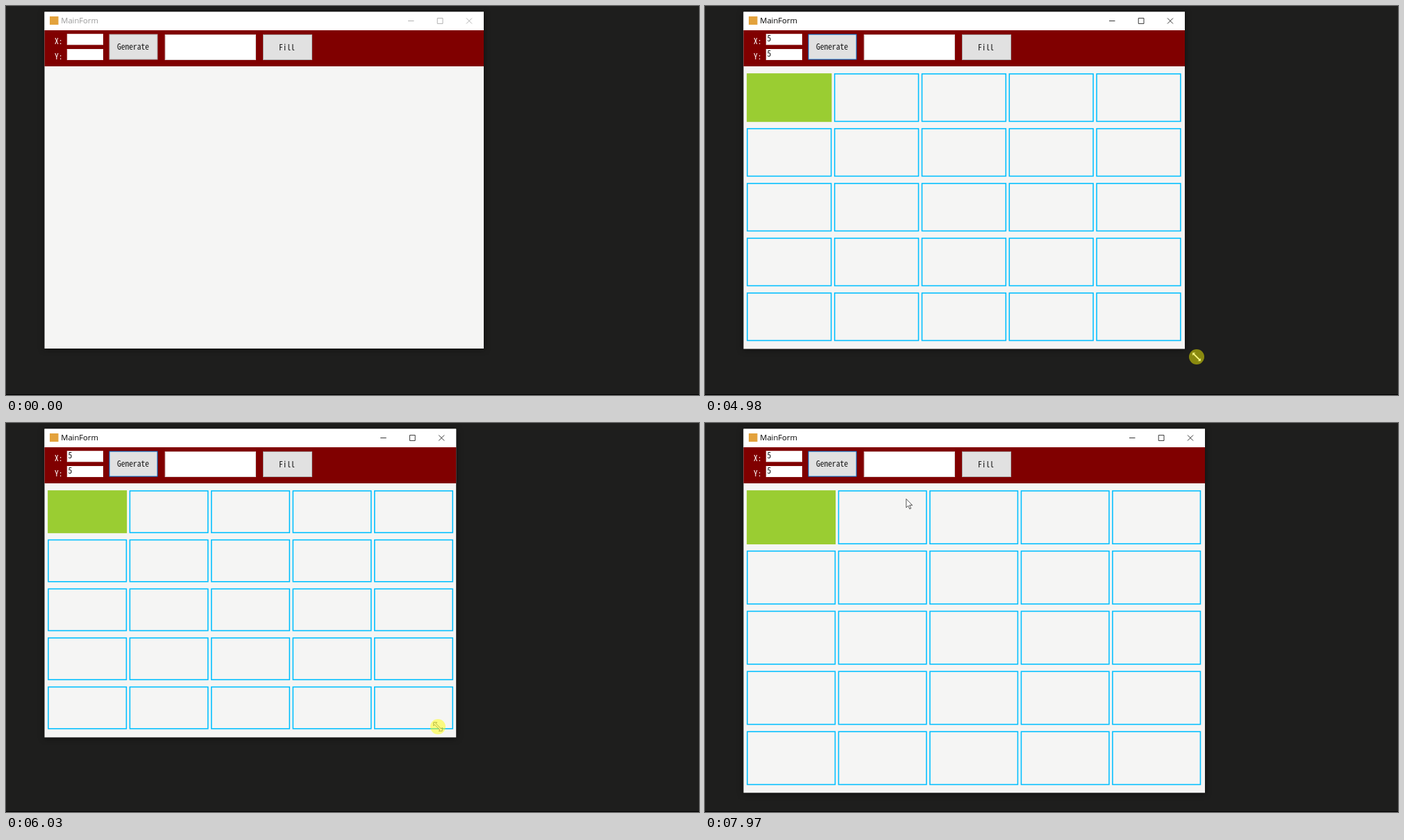
An HTML page that plays this animation: 998 by 561 pixels, repeating every 8000 ms.

```html
<!DOCTYPE html>
<html lang="en">
<head>
<meta charset="utf-8">
<title>Grid form</title>
<style>
  html, body { margin: 0; width: 100%; height: 100%; overflow: hidden; background: #1e1e1d; }
  svg { display: block; width: 998px; height: 561px; }
  text { white-space: pre; }
  .title { font: 11.2px "Open Sans", "Noto Sans", sans-serif; }
  .mono { font-family: "Noto Sans Mono CJK SC", "Liberation Mono", monospace; }
  .glyph { fill: none; stroke-width: .9; }
  .frame { filter: drop-shadow(0 1.5px 4px rgba(0, 0, 0, .55)); }
</style>
</head>
<body>
<svg id="stage" viewBox="0 0 998 561"></svg>
<script>
const LOOP = 8000, STEP = 77.4, UNIT = 998 / 1920;
const LEFT = 55.5, TOP = 8.5, N = 5;
const BLUE = '#0078d7';
const stage = document.getElementById('stage');

function set(node, attrs) {
  for (const a in attrs) node.setAttribute(a, attrs[a]);
  return node;
}
function add(tag, attrs, parent = stage) {
  return parent.appendChild(set(document.createElementNS('http://www.w3.org/2000/svg', tag), attrs));
}
function box(x, y, width, height, fill, stroke = 'none') {
  return add('rect', { x, y, width, height, fill, stroke });
}
function label(x, y, str, fill, cls = 'mono', anchor = 'start') {
  const node = add('text', { x, y, fill, class: cls, 'text-anchor': anchor });
  node.textContent = str;
  return node;
}
const show = (node, on) => set(node, { visibility: on ? 'visible' : 'hidden' });

// Pick the size at which one monospaced character is 5.75px wide
const pen = document.createElement('canvas').getContext('2d');
pen.font = '100px "Noto Sans Mono CJK SC", "Liberation Mono", monospace';
const monoSize = 575 / pen.measureText('0').width;
stage.style.fontSize = monoSize + 'px';

// Window
box(0, 560, 998, 1, '#000');
const frame = set(box(LEFT, TOP, 0, 0, '#f5f5f4'), { class: 'frame' });
const bar = box(LEFT, TOP, 0, 26.5, '#fff');
const header = box(LEFT, 35, 0, 52, '#800000');
box(63, 15, 12.5, 12, '#e3a23c');
const title = label(79.3, 25.4, 'MainForm', '#999', 'title');
const glyphs = add('path', {
  class: 'glyph',
  d: 'M-109 21.5h8.5M-66.8 17.6h7.8v7.8h-7.8zM-25 17.5l8 8M-17 17.5l-8 8'
});

// Header controls
label(70, 54.8, 'X:', '#fff');
label(70, 76.6, 'Y:', '#fff');
const inX = box(88.3, 40.7, 51.2, 15, '#fff', '#f4eeee');
const inY = box(88.3, 62.5, 51.2, 15, '#fff', '#f4eeee');
const textX = label(89.6, 51.2, '5', '#111');
const textY = label(89.6, 73, '5', '#111');
const caret = box(0, 0, .8, 11, '#000');
const button = box(149, 41, 69, 36, '#e1e1e1', '#adadad');
label(183, 63.3, 'Generate', '#111', 'mono', 'middle');
box(229.2, 41.5, 130.3, 36, '#fff', '#d9cfcf');
box(370.5, 41.5, 70, 36, '#e1e1e1', '#adadad');
label(404.5, 63.8, 'Fill', '#111', 'mono', 'middle');

// Cells
const grid = add('g', { fill: 'none', 'stroke-width': 1.56 });
const cells = Array.from({ length: N * N }, (_, i) =>
  add('rect', i ? { stroke: '#00bfff' } : { fill: '#9acd32', stroke: '#9acd32' }, grid));

// Pointers
const pointer = (d, attrs) => add('path', { d, fill: '#fff', stroke: '#111', 'stroke-width': .7, ...attrs });
const pointers = {
  arrow: pointer('M0 0V12.5L2.9 9.8 4.9 14.5 6.8 13.7 4.8 9.1H8.8Z'),
  beam: pointer('M-2-5H2M0-5V5M-2 5H2', { fill: 'none' }),
  size: pointer('M-6.2-6.2H-1.4L-3-4.6 4.6 3 6.2 1.4V6.2H1.4L3 4.6-4.6-3-6.2-1.4Z', { 'stroke-width': .6 })
};
const halo = add('circle', { r: 11, fill: 'rgba(255,255,0,.48)' });

// step, x, y
const PATH = [
  [1, 921, 543], [3, 790, 430], [6, 400, 195], [9, 150, 62], [11, 112, 45],
  [30, 112, 46], [34, 180, 60], [39, 180, 60], [41, 300, 140], [44, 615, 347],
  [45, 615, 347], [49, 660, 440], [52, 683, 498], [54, 684, 496], [56, 687, 494.5],
  [62, 687, 494.5], [63, 690, 494.5], [64, 708, 506], [67, 742, 524], [70, 758, 533],
  [71, 758, 532], [72, 756, 528], [73, 742, 518], [77, 647.2, 453.4], [78, 622, 438],
  [79, 606, 428], [81, 606, 428], [82, 610, 434], [85, 641, 470.5], [86, 659, 487],
  [89, 702, 518], [92, 719, 533.3], [93, 719, 533.3], [96, 520, 360], [99, 312, 182],
  [101, 312, 182], [102, 298, 134], [103, 289.8, 109.5]
];
// step from which each pointer is used
const KINDS = [[0, ''], [1, 'arrow'], [10, 'beam'], [20, ''], [30, 'beam'], [32, 'arrow'], [56, 'size'], [94, 'arrow']];
const PRESSES = [[11, 13], [35, 37], [60, 94]];
const CARETS = [[12, 90.2, 43], [20, 95.6, 43], [23, 90.2, 63.8], [27, 95.6, 63.8]];

const latest = (table, k) => table.filter(row => row[0] <= k).pop();

function at(k) {
  const i = PATH.findIndex(p => p[0] >= k);
  if (i < 0) return PATH[PATH.length - 1].slice(1);
  if (i === 0) return PATH[0].slice(1);
  const [a, x, y] = PATH[i - 1], [b, u, v] = PATH[i];
  const f = (k - a) / (b - a);
  return [x + (u - x) * f, y + (v - y) * f];
}

// The dragged corner trails the pointer by one step
function corner(k) {
  if (k < 63) return [688, 494];
  const [x, y] = at(Math.min(k - 1, 92));
  return [x + 1, y];
}

function layout(right, bottom) {
  const width = right - LEFT;
  set(frame, { width, height: bottom - TOP });
  set(bar, { width });
  set(header, { width });
  set(glyphs, { transform: `translate(${right})` });
  const snap = size => Math.floor(size / N / UNIT) * UNIT;
  const px = snap(width - 5.2), py = snap(bottom - 98);
  cells.forEach((cell, i) => set(cell, {
    x: 60.9 + i % N * px, y: 97.9 + Math.floor(i / N) * py,
    width: px - 5, height: py - 10.5
  }));
}

function controls(k) {
  const active = k >= 11;
  set(title, { fill: active ? '#000' : '#999' });
  set(glyphs, { stroke: active ? '#222' : '#aaa' });
  set(inX, { stroke: k >= 12 && k < 23 ? BLUE : '#f4eeee' });
  set(inY, { stroke: k >= 23 && k < 35 ? BLUE : '#f4eeee' });
  show(textX, k >= 20);
  show(textY, k >= 27);
  const c = latest(CARETS, k);
  if (c) set(caret, { x: c[1], y: c[2] });
  show(caret, c && k < 35);
  const down = k === 35 || k === 36, over = k >= 33 && k < 40;
  set(button, {
    fill: down ? '#cce4f7' : over ? '#e5f1fb' : '#e1e1e1',
    stroke: down ? '#005499' : k >= 33 ? BLUE : '#adadad'
  });
  show(grid, k >= 36);
}

function mouse(k) {
  const [x, y] = at(k), kind = latest(KINDS, k)[1];
  for (const name in pointers) {
    set(pointers[name], { transform: `translate(${x} ${y})` });
    show(pointers[name], name === kind);
  }
  set(halo, { cx: x, cy: y });
  show(halo, PRESSES.some(([a, b]) => k >= a && k < b));
}

let last = -1;
function draw() {
  const k = Math.floor((performance.now() % LOOP + 28) / STEP);
  if (k !== last) {
    last = k;
    layout(...corner(k));
    controls(k);
    mouse(k);
  }
  requestAnimationFrame(draw);
}
draw();
</script>
</body>
</html>
```
